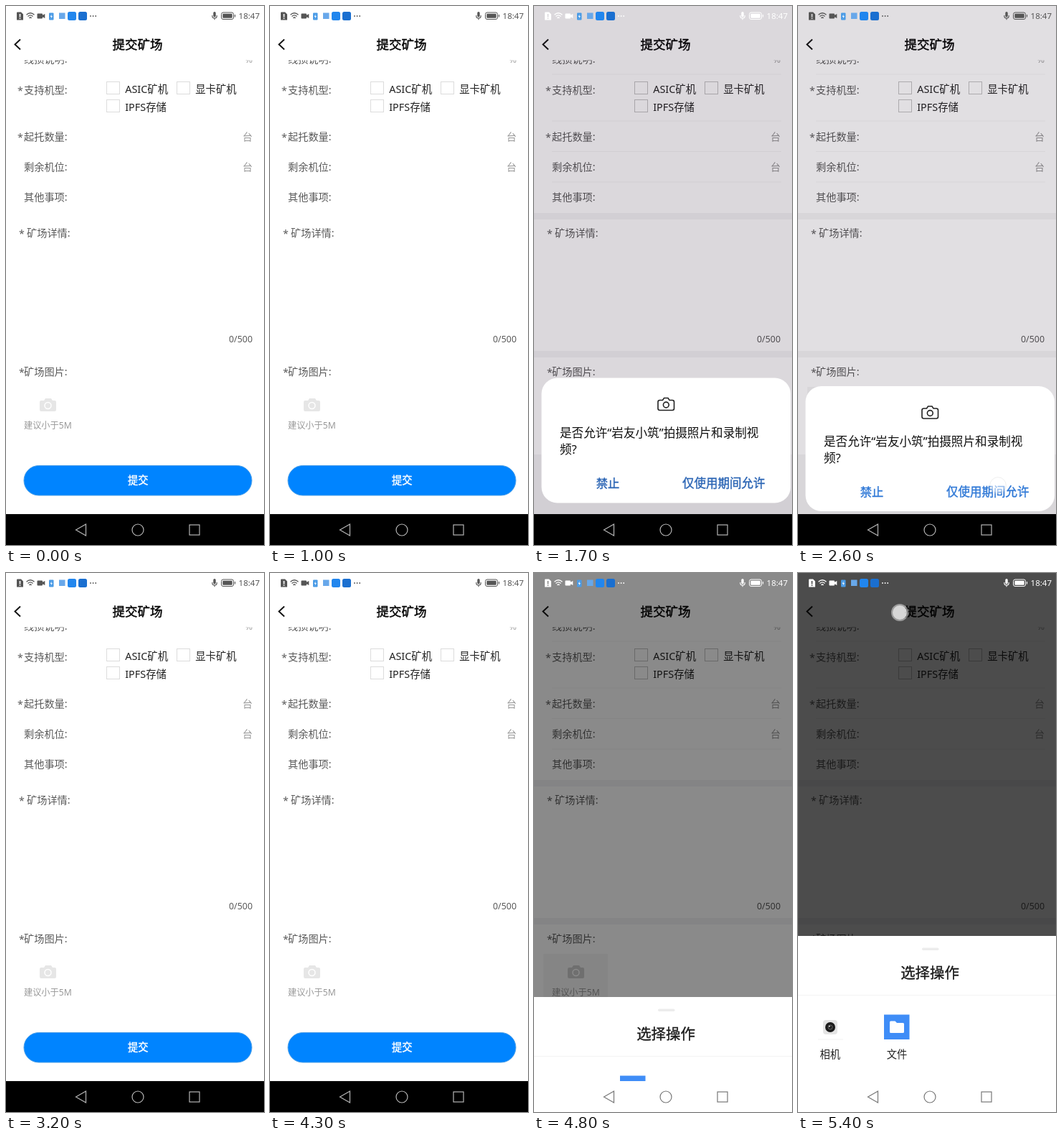
Write an HTML page that moves like this. It is 360x750 px and loops after 5500 ms.

```html
<!DOCTYPE html>
<html lang="zh-CN">
<head>
<meta charset="utf-8">
<style>
  html, body { margin: 0; width: 100%; height: 100%; overflow: hidden; background: #fff; }
  svg { display: block; width: 100%; height: 100%; }
  text { font-family: "Noto Sans", "Noto Sans CJK SC", "Noto Sans CJK", sans-serif; }
  .rules { display: none; }
  .dimmed .rules { display: inline; }
  .check { fill: none; stroke: #dcdcdc; }
  .dimmed .check { stroke: #c2c2c2; }
  .photo { fill: #e6e6e6; }
  .dimmed .photo { fill: #cdcdcd; }
  .strong { stroke: currentColor; stroke-width: .4; }
  #status { color: #555; }
  #status.light { color: #fff; }
  #nav { color: #b5b5b5; }
  #nav.light { color: #777; }
  #nav.light rect.bar { fill: #fff; }
  #header { color: #000; }
  #submit { color: #fff; }
  #sheetTitle { color: #1a1a1a; }
  #actions { color: #2a64b4; }
  #actions.pressed { color: #2f78d6; }
</style>
</head>
<body>
<svg id="stage" viewBox="0 0 360 750">
  <defs>
    <clipPath id="body"><rect y="75.5" width="360" height="640"/></clipPath>
  </defs>
  <rect width="360" height="750" fill="#fff"/>

  <g class="rules" id="rules"></g>
  <g id="form" clip-path="url(#body)"></g>
  <g>
    <path class="photo" d="M49 549h4l2-3h8l2 3h3q2 0 2 2v11q0 2-2 2H49q-2 0-2-2v-11q0-2 2-2z"/>
    <circle cx="58.5" cy="556" r="4.5" fill="none" stroke="#fff" stroke-width="1.5"/>
  </g>
  <g id="submit">
    <rect x="25" y="639.5" width="318" height="41.5" rx="20.7" fill="#0084ff" stroke="#4a9fe8"/>
  </g>
  <g id="header">
    <path d="M20 46.5L12.5 53.5L20 60.5" fill="none" stroke="#111" stroke-width="1.9"/>
  </g>
  <rect id="shade" width="360" height="750"/>

  <g id="status" fill="currentColor">
    <path fill-rule="evenodd" d="M16 8.5h5l3 3v8h-9v-10q0-1 1-1zM18.7 11v4.5h1.6v-4.5zM18.7 16.5v1.6h1.6v-1.6z"/>
    <g fill="none" stroke="currentColor" stroke-width="1.3">
      <path d="M28.5 12.2q5.5-5 11 0M30.5 14.5q3.5-3.2 7 0M32.4 16.7q1.6-1.5 3.2 0"/>
      <rect x="300.5" y="9" width="17" height="9.5" rx="2.5" stroke-width="1"/>
      <path d="M287.8 13v1q0 3 3.2 3t3.2-3v-1M291 17v2.3M319.5 12v3.5" stroke-width="1.1"/>
    </g>
    <rect x="302.3" y="10.8" width="13.4" height="5.9" rx="1"/>
    <rect x="289.3" y="8" width="3.4" height="7.5" rx="1.7"/>
    <path d="M44.5 10.5h5.5q1 0 1 1v1.2l3.3-1.7v6l-3.3-1.7v1.2q0 1-1 1h-5.5q-1 0-1-1v-5q0-1 1-1z"/>
    <rect x="60" y="9.5" width="6.5" height="10" rx="1" fill="#4a9be6"/>
    <path d="M63.7 11.5l-2 3.5h1.4l-.4 2.5l2.2-3.5h-1.5z" fill="#fff"/>
    <rect x="74" y="9.5" width="8.5" height="8.5" fill="#68a8ea"/>
    <rect x="86" y="8" width="12" height="12" rx="2.5" fill="#2186ee"/>
    <rect x="101" y="8" width="12" height="12" rx="2.5" fill="#1a6fd0"/>
    <circle cx="118" cy="14" r=".9"/><circle cx="121.6" cy="14" r=".9"/><circle cx="125.2" cy="14" r=".9"/>
  </g>

  <g id="sheet">
    <rect y="505" width="360" height="245" fill="#fff"/>
    <rect x="173" y="521.5" width="23.5" height="3.5" rx="1.7" fill="#ececec"/>
    <path d="M0 587.5h360M28 649h35" stroke="#f3f3f3"/>
    <rect x="35" y="622" width="20" height="20" rx="4" fill="#e4e4e4"/>
    <circle cx="45" cy="632" r="7" fill="#1c1c1c"/>
    <circle cx="45" cy="632" r="3" fill="none" stroke="#666"/>
    <circle cx="44" cy="630.8" r="1" fill="#ddd"/>
    <rect x="120" y="614.5" width="35.5" height="34.5" fill="#3f8df7"/>
    <path d="M129.5 623.5h6l2.5 2.5h8.5q1.5 0 1.5 1.5v11q0 1.5-1.5 1.5h-17q-1.5 0-1.5-1.5v-13.5q0-1.5 1.5-1.5z" fill="#fff"/>
  </g>

  <g id="nav" fill="none" stroke="currentColor" stroke-width="1.2">
    <rect class="bar" y="707" width="360" height="43" fill="#000" stroke="none"/>
    <path d="M97.5 729L111.5 721V737Z"/>
    <circle cx="184" cy="729" r="8"/>
    <rect x="256" y="722" width="14" height="14"/>
  </g>

  <g id="sheetTitle"></g>

  <g id="dialog">
    <rect x="10.5" y="517.5" width="347.5" height="174" rx="22" fill="#fff"/>
    <g fill="none" stroke="#222" stroke-width="1.6">
      <path d="M175.5 548.5h4l2-3h5.5l2 3h4q2.5 0 2.5 2.5v9q0 2.5-2.5 2.5h-17.5q-2.5 0-2.5-2.5v-9q0-2.5 2.5-2.5z"/>
      <circle cx="184.3" cy="555" r="3.9"/>
    </g>
    <g id="actions"></g>
  </g>

  <g id="touch">
    <circle r="12" fill="#fff" opacity=".45"/>
    <circle r="10" fill="#fff" opacity=".75"/>
    <circle r="11.3" fill="none" stroke="#bbb" stroke-width=".7" opacity=".6"/>
  </g>
</svg>
<script>
const NS = 'http://www.w3.org/2000/svg';
const el = id => document.getElementById(id);

function add(parent, tag, attrs) {
  const node = document.createElementNS(NS, tag);
  for (const key in attrs) node.setAttribute(key, attrs[key]);
  return el(parent).appendChild(node);
}

// Places text so that its ideographs are vertically centred on y.
function label(parent, text, x, y, size = 14.2, fill = '#5a5a5a', extra = {}) {
  const node = add(parent, 'text', { x, y: y + size * 0.37, 'font-size': size, fill, ...extra });
  node.textContent = text;
}
const middle = { 'text-anchor': 'middle' };
const end = { 'text-anchor': 'end' };

// Centred, slightly heavier text in the colour of its group.
function strong(parent, text, x, y, size) {
  label(parent, text, x, y, size, 'currentColor', { ...middle, class: 'strong' });
}

function buildForm() {
  for (const [text, y, star] of [
    ['线损说明:', 73.5], ['支持机型:', 117, 16], ['起托数量:', 181.5, 16],
    ['剩余机位:', 223.5], ['其他事项:', 266], ['矿场图片:', 509, 18]
  ]) {
    label('form', text, 25, y);
    if (star) label('form', '*', star, y + 1);
  }
  label('form', '*', 18, 316.5);
  label('form', '矿场详情:', 29, 316);
  label('form', '%', 344, 74, 13, '#999', end);
  label('form', '台', 344, 181.5, 14, '#999', end);
  label('form', '台', 344, 223.5, 14, '#999', end);
  label('form', '0/500', 344, 463, 12.4, '#5a5a5a', end);
  label('form', '建议小于5M', 25, 583, 12.2, '#999');
  for (const [text, x, y] of [['ASIC矿机', 140.5, 115.5], ['显卡矿机', 238.5, 115.5], ['IPFS存储', 140.5, 140.5]]) {
    add('form', 'rect', { class: 'check', x, y: y - 10, width: 18, height: 17 });
    label('form', text, x + 25.7, y, 14.4, '#222');
  }
  for (const y of [95, 160, 202.5, 245]) add('rules', 'path', { d: `M25 ${y}h320`, stroke: '#f3f3f3' });
  for (const [y, height] of [[288, 9], [480, 9], [624, 83]])
    add('rules', 'rect', { y, width: 360, height, fill: '#f4f4f5' });
  add('rules', 'rect', { x: 13, y: 530, width: 90, height: 74, fill: '#f5f5f5' });
}

buildForm();
strong('header', '提交矿场', 183.5, 54, 17.5);
strong('submit', '提交', 184.3, 660, 14.3);
label('status', '18:47', 354, 14, 11.5, 'currentColor', end);
label('sheet', '相机', 44.8, 670, 14.3, '#222', middle);
label('sheet', '文件', 138, 670, 14.3, '#222', middle);
strong('sheetTitle', '选择操作', 184, 556, 20.4);
label('dialog', '是否允许“岩友小筑”拍摄照片和录制视', 36, 594, 16.6, '#111');
label('dialog', '频?', 36, 617, 16.6, '#111');
strong('actions', '禁止', 103, 664, 16.3);
strong('actions', '仅使用期间允许', 264.7, 664, 16.5);

// Piecewise linear value from [time, value] points.
function track(points, t) {
  const next = points.findIndex(p => p[0] > t);
  if (next === 0) return points[0][1];
  if (next < 0) return points[points.length - 1][1];
  const [t0, a] = points[next - 1], [t1, b] = points[next];
  return a + (b - a) * (t - t0) / (t1 - t0);
}

const LOOP = 5500, STEP = 100;
const dimPoints = [
  [1500, 0], [1700, 0.155], [1800, 0.18], [2400, 0.18], [2600, 0.13], [2800, 0],
  [4500, 0], [4700, 0.32], [4900, 0.6], [5100, 0.7]
];
const dialogPoints = [[1600, 110], [1700, 0], [2500, 0], [2600, 11.5], [2700, 110], [2800, 240]];
const sheetPoints = [[4600, 245], [4700, 195], [4800, 85], [4900, 28], [5000, 6], [5100, 0]];

const show = (id, on) => { el(id).style.display = on ? '' : 'none'; };
const move = (id, x, y) => el(id).setAttribute('transform', `translate(${x} ${y})`);

function render(ms) {
  const t = Math.floor(ms % LOOP / STEP) * STEP;
  const dim = track(dimPoints, t);
  const asking = t >= 1600 && t < 2800;
  const choosing = t >= 4700;

  el('shade').setAttribute('opacity', dim);
  el('shade').setAttribute('fill', asking ? '#1c0a20' : '#000');
  el('stage').classList.toggle('dimmed', dim > 0);
  el('status').classList.toggle('light', (asking && t < 2600) || t >= 4600);
  el('nav').classList.toggle('light', choosing);

  show('dialog', asking);
  move('dialog', 0, track(dialogPoints, t));
  el('actions').classList.toggle('pressed', t >= 2300);

  const drop = track(sheetPoints, t);
  for (const id of ['sheet', 'sheetTitle']) {
    show(id, choosing);
    move(id, 0, drop);
  }

  const allowTap = t >= 2300 && t < 2700, outsideTap = t >= 5300;
  show('touch', allowTap || outsideTap);
  el('touch').setAttribute('opacity', allowTap ? (t < 2600 ? 0.8 : 0.6) : 0.9);
  if (allowTap) move('touch', 279, 667);
  else move('touch', 142, 55);
}

const start = performance.now();
function tick() {
  render(performance.now() - start);
  requestAnimationFrame(tick);
}
tick();
</script>
</body>
</html>
```
